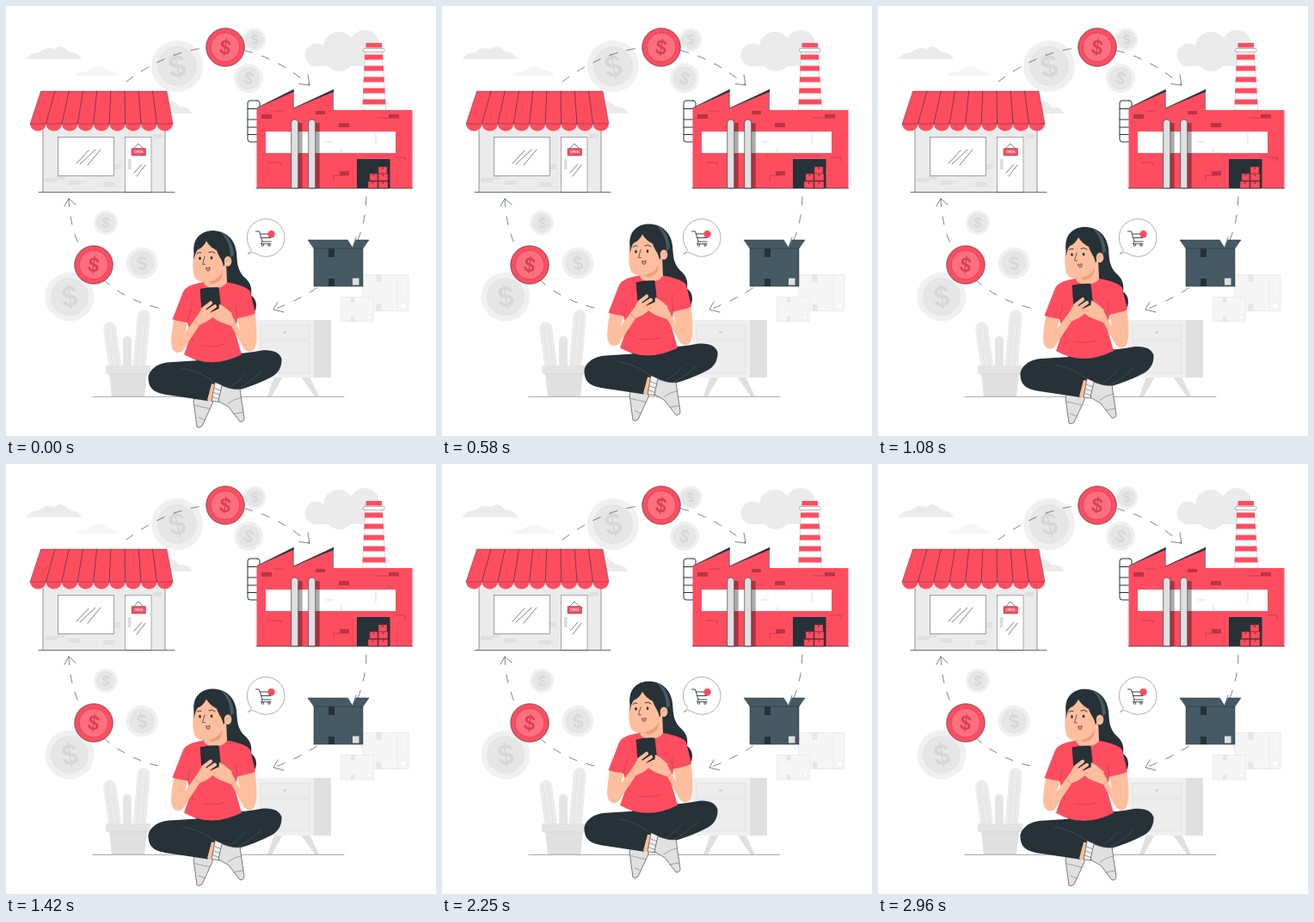
Animation of 500x500 px, one loop 3 s. Source, as an HTML page:

```html
<!DOCTYPE html>
<html lang="en">
<head>
<meta charset="utf-8">
<style>
html, body { margin: 0; width: 100%; height: 100%; overflow: hidden; background: #fff; }
svg { display: block; width: 100vw; height: 100vh; }
text { font-family: Inter, Roboto, sans-serif; font-weight: 600; text-anchor: middle; }
</style>
</head>
<body>
<svg id="stage" viewBox="0 0 500 500"></svg>
<script>
const PINK = '#ff4d60', DARK = '#263238', SLATE = '#455a64', SKIN = '#ffbe9d';
const BRICK = '#b83645', SHADE = '#0005', G1 = '#f5f5f5', G2 = '#ebebeb', G3 = '#e0e0e0';

const range = (n, f) => Array.from({ length: n }, (_, i) => f(i)).join('');
const path = (d, fill, stroke = 'none', w = .7, extra = '') =>
  `<path d="${d}" fill="${fill}" stroke="${stroke}" stroke-width="${w}" ${extra}/>`;
const line = (d, stroke = DARK, w = .7, extra = '') =>
  path(d, 'none', stroke, w, 'stroke-linecap="round" stroke-linejoin="round" ' + extra);
const rect = (x, y, w, h, fill, stroke = 'none', sw = .7, rx = 0) =>
  `<rect x="${x}" y="${y}" width="${w}" height="${h}" rx="${rx}" fill="${fill}" stroke="${stroke}" stroke-width="${sw}"/>`;
const oval = (x, y, rx, ry, fill, stroke = 'none', w = .7) =>
  `<ellipse cx="${x}" cy="${y}" rx="${rx}" ry="${ry}" fill="${fill}" stroke="${stroke}" stroke-width="${w}"/>`;
const disc = (x, y, r, ...style) => oval(x, y, r, r, ...style);

function coin(x, y, r, tilt, pink) {
  const [rim, edge, face, ring, sign] = pink
    ? [PINK, DARK, '#ff7080', '#c93a4a', '#d83f50']
    : ['#f0f0f0', 'none', '#e6e6e6', '#dedede', '#d6d6d6'];
  const size = r * (pink ? .98 : 1.1);
  return disc(x, y, r, rim, edge, .6) + disc(x, y, r * .75, face, ring, .6) +
    `<text transform="translate(${x} ${y}) rotate(${tilt})" y="${size * .36}" font-size="${size}" fill="${sign}">$</text>`;
}

function clouds() {
  return path('M24 62Q28 54 39 54Q45 47 57 50Q64 43 73 53Q84 54 88 62Z', G2) +
    path('M80 81Q84 76 92 77Q100 71 108 70Q116 70 119 75Q128 75 131 81Z', G1) +
    path('M180 125L184 110Q194 107 201 117Q214 117 216 125Z', G2) +
    disc(361, 57, 13.5, G2) + disc(387, 48, 18, G2) + disc(388, 59, 17, G2) +
    disc(417, 45, 17, G2) + rect(361, 52, 56, 18, G2);
}

function arrows() {
  const dash = 'stroke-dasharray="9.5 11.5"';
  return line('M140 88Q250 6 353 92', DARK, .6, dash) + line('M341 90.5L353 92L351 80', DARK, .6) +
    line('M73 224C75 285 110 335 177 351', DARK, .6, dash) + line('M68 233L73 224L81 231', DARK, .6) +
    line('M419 222C417 285 385 325 311 353', DARK, .6, dash) + line('M316 344L311 353L323 356', DARK, .6);
}

function shop() {
  const bricks = [[45, 200, 14, 5], [73, 203, 14, 5], [113, 205, 14, 5], [126, 184, 7, 6], [171, 149, 11, 5], [59, 198, 9, 4]];
  return rect(43, 137, 142, 79, G2) + bricks.map(b => rect(...b, G3)).join('') +
    line('M43 144V216M185 144V216', DARK, .5) +
    rect(60.5, 152.5, 65, 45, '#fff', '#666', .6) +
    line('M82 183L96 168M86 184L104 167M95 185L110 167', DARK, .6) +
    rect(138.5, 152.5, 30.5, 64, '#fff', '#777', .6) +
    rect(142, 178, 3.5, 12, '#dcdcdc') + line('M149 194L158 184M152 198L162 185', DARK, .6) +
    line('M148 166L154 160L160 166', DARK, .6) + rect(146, 165.5, 16.5, 8.5, PINK, DARK, .4, 1) +
    '<text x="154.2" y="171.2" font-size="3.8" fill="#fff">OPEN</text>' +
    range(9, i => path(`M${28 + 18.44 * i} 136h18.44v1a9.22 8.5 0 0 1-18.44 0z`, PINK)) +
    path('M40.5 99H187L194 137H28Z', PINK, DARK, .4) +
    range(8, i => line(`M${57 + 16.2 * i} 99L${46.4 + 18.44 * i} 137`, DARK, .6)) +
    line('M38 216.5H196', DARK, .7);
}

function factory() {
  const bricks = [[297, 126, 12, 5], [360, 122, 11, 4], [387, 136, 12, 5], [445, 126, 12, 4.5], [388, 192, 11, 5]];
  const crates = [[433, 187, 10, 8], [421, 204, 11, 8], [433, 204, 11, 8], [423, 195, 9, 8], [433, 195, 11, 8]];
  const pipe = x => rect(x + 8, 136, 5, 76, SHADE) +
    path(`M${x} 212V136q0-4 4-4t4 4V212Z`, G3, DARK, .6);
  return line('M292 110H284Q281 110 281 113V155Q281 158 284 158H292M281 119.5H295M281 132H295M281 141H295M281 149.5H295M295 118V112Q295 110 292 110', DARK, 1) +
    path('M418 47H437L441.5 121H414.5Z', '#fff', '#bbb', .5) +
    range(5, i => {
      const y = 56.5 + 13 * i, a = 417.6 - .042 * (y - 47), b = 437.4 + .06 * (y - 47);
      return path(`M${a} ${y}H${b}L${b + .4} ${y + 6}H${a - .4}Z`, PINK);
    }) +
    rect(418.5, 43, 18.5, 5.5, PINK) + rect(415.5, 49.5, 24.5, 4, '#fff', '#888', .6, 1) +
    path('M291.5 119L334 98V119L380 98V121H472.5V212H291.5Z', PINK) +
    path('M291.5 118.5L334.5 97V99.5ZM334 119L381 97V99.5Z', DARK, DARK, .4) + line('M334.3 98V119M380.5 98V121', DARK, .6) +
    bricks.map(b => rect(...b, BRICK)).join('') +
    line('M307 182H320V185M432 130H444M381 203V197H393M452 176H464V180M311 122H322', '#a03340', .6) +
    rect(302, 146, 151, 25, '#fff') + line('M372 158H380M390 171V165M430 149V160', '#ffb2bb', .7) +
    pipe(331.7) + pipe(351.7) +
    rect(408, 178, 38.5, 34, DARK) +
    crates.map(([x, y, w, h]) => rect(x, y, w, h, PINK, '#8c2a36', .6) + rect(x + w / 2 - 1, y, 2, 3, BRICK)).join('') +
    line('M291 212H473', DARK, .7);
}

function boxes() {
  const ghost = (x, y, w, h, s) => rect(x, y, w, h, G1, '#e6e6e6', .7) +
    rect(x + w * .3, y, s, s * 1.4, '#e6e6e6') + rect(x + w * .3, y + h - s * 1.3, s, s * 1.3, '#e6e6e6') +
    rect(x + w - s - 3, y + h - s - 3, s, s, '#fff', '#e6e6e6', .5);
  return ghost(414.5, 312.5, 53.5, 42, 6) + line('M455 313V354', '#e6e6e6', .6) +
    ghost(389.5, 338.5, 38, 28.5, 4.5) +
    rect(358, 280, 57, 46, SLATE, DARK, .5) +
    path('M351 272H422L415 282H358Z', SLATE, DARK, .5) +
    path('M397 271L403 280.5L407 271Z', '#fff') + line('M407 269L403.5 279', DARK, .6) +
    rect(375, 282, 7, 10, DARK) + rect(375, 317, 7, 9, DARK) + rect(403, 316.5, 7.5, 8, G3);
}

function room() {
  const cactus = (x, y, w, tilt, fill) => {
    const h = 422 - y;
    return `<g transform="rotate(${tilt} ${x} 420)">` + rect(x - w / 2, y, w, h, fill, 'none', 0, w / 2) +
      line(`M${x - w / 5} ${y + 7}V420M${x + w / 5} ${y + 7}V420`, '#dedede', .6) + '</g>';
  };
  return cactus(127, 367, 15, -8, G2) + cactus(155, 353, 15, 5, G2) + cactus(141, 384, 10, 0, '#e6e6e6') +
    path('M120 427H164L161 454H123Z', G3) + rect(116, 418, 52, 9.5, '#e3e3e3') + line('M119 428H165', '#d2d2d2', .7) +
    path('M312 431H322L309 454H304ZM343 431H353L364 454H359Z', G3) +
    rect(291, 365, 67, 67, '#f0f0f0') + rect(358, 365, 20, 67, G3) +
    rect(296, 371, 57, 17, '#ededed', '#dcdcdc') + rect(296, 390, 57, 37, '#ededed', '#dcdcdc') +
    oval(324, 379.5, 2, 1.3, '#cfcfcf') + line('M101 454.3H393', '#666', .6);
}

function bubble() {
  return path('M285.5 283.5A21.8 21.8 0 1 1 289.5 287.2Q285.5 285.5 281 288.5Q284.5 286 285.5 283.5Z', '#fff', '#777', .6) +
    line('M290.5 262H294.5L298 274H308M295.5 265H307M297 269.5H308L309.5 266', DARK, .9) +
    line('M298 274L296.5 276.5H308', DARK, .8) +
    disc(298.5, 278, 1.3, '#fff', DARK, .8) + disc(306, 278, 1.3, '#fff', DARK, .8) +
    disc(308.5, 265.3, 4.2, PINK) + line('M306.8 266L308.3 267.2L310.5 264', '#d83f50', .6);
}

function woman() {
  const fold = '#b83c4a', crease = '#d98a6c';
  const backHair =
    path('M219 286C216 271 227 261 240 261C256 261 266 271 268 286C269 299 269 306 276 314C285 322 286 327 285 336C293 342 292 352 288 357L255 345L232 326C228 318 220 300 219 286Z', DARK);

  const legs =
    path('M222 448L241 454L240 462L228 488Q225 491 222 489L218 459Z', G3, DARK, .6) +
    line('M220 464L237 468M224 478L231 481', '#777', .6) +
    path('M252 405Q279 404 299 400Q317 399 320.5 410Q321 424 309 431Q290 441 268 447L236 458L225 430Z', DARK) +
    path('M208 404L222 412L190 414C174 415 165 425 165.5 433C166 446 174 449 185 451.5L235 459Q241 450 243 438Q262 433 276 416L274 403Z', DARK) +
    line('M205 421Q228 425 243 438M268 446Q288 435 297 424M279 427Q272 436 262 442', SLATE, .6) +
    path('M239 439L245 440L241 460L234 458Z', SKIN) +
    path('M243 437L252 441L248 460L239 459Z', '#f0f0f0', DARK, .6) +
    line('M242 444L250 447M241 449L249 452M240 454L248 457', '#666', .6) +
    path('M251 441Q263 446 272 445L277 479Q277 483 272 483L259 466L247 459Z', G3, DARK, .6) +
    line('M258 462Q266 456 274 455M265 474L276 472', '#777', .6);

  const torso =
    path('M229 321C217 323 209 326 206 332L193.5 364Q201 368 211 368L215 382L207 405Q238 423 274 405L267 381L269 363Q281 363 290 357L284 332Q280 325 257 321Z', PINK) +
    line('M211 368L215 352M269 363L267 348M228 394Q240 397 254 393M215 382L218 390', fold, .6);

  const head =
    path('M236 310L256 298L257 321Q253 328 241 328Q231 327 230 321L236 319Z', SKIN) +
    path('M236 320Q248 318 252 308Q252 321 239 323Z', '#ee9d7e') +
    path('M220 282C216 296 217 309 219.5 315Q223 322 234 320.5Q248 317 253 303L258 287L246 271L230 272Z', SKIN) +
    path('M218.5 288C217 273 227 261.5 240 261.5C254 261.5 263 271 264 287Q263 292 257 293L253 303C252 295 247 291 245 284Q237 280 233 273Q229 281 223 283Q220 286 218.5 296Z', DARK) +
    oval(258, 296.5, 4.3, 5.8, SKIN) + line('M256 297Q257 293 260 295', crease, .7) +
    path('M249 262.5Q263 267 265 289L261 293Q261 273 249 262.5Z', SLATE) +
    oval(225.5, 293, 1.3, 1.9, DARK) + oval(239, 292.5, 1.3, 1.9, DARK) +
    line('M222 287.5Q224 285.5 227 286.5M236 286Q240 284 243 287', DARK, .9) +
    line('M231 291L228.5 300H231.5', DARK, .7) +
    path('M232.5 304Q235 305 237 303.5Q238 307.5 235 308Q232.5 307.5 232.5 304Z', '#ff8a94', DARK, .6);

  const finger = d => line(d, SKIN, 4.2);
  const arms =
    path('M195 365L211 368L208 380L226 355Q230 347 236 347L238 358Q232 367 225 371L205 401Q198 405 194 399C190 392 193 379 195 365Z', SKIN) +
    path('M290 358L269 363L272 377L263 360Q255 348 247 346L244 358L249 367L262 372L277 399Q284 405 289 398C293 390 291 374 290 358Z', SKIN) +
    path('M226 329Q236 326.5 247 327L250 353L228 356Z', DARK, '#111', .5) +
    path('M225 355L231 348Q234 360 242 360Q233 369 224 370Z', SKIN) +
    finger('M229 352L238 345') + finger('M231 357L243 349') + finger('M234 361L247 354') +
    path('M248 346L263 357L257 369L249 367Q242 364 239 360L247 358Z', SKIN) +
    line('M249 347Q257 350 262 357M225 371Q221 369 220 365M262 372Q266 370 267 367', crease, .7);

  return backHair + legs + torso + head + arms;
}

const greyCoins = [[199, 70, 30, -12], [289, 39, 13.5, -10], [282, 84, 17, 18], [116, 252, 14, 8], [158, 299, 18.5, -8], [74, 338, 28.5, -8]];

document.getElementById('stage').innerHTML =
  clouds() + greyCoins.map(c => coin(...c)).join('') + arrows() +
  coin(255, 48, 22.3, 8, true) + coin(102, 301, 22.3, 8, true) +
  shop() + factory() + boxes() + room() + bubble() + `<g id="woman">${woman()}</g>`;

const floater = document.getElementById('woman');
const start = performance.now();

// Steady rise and fall of 10 units, 1.5 s per cycle.
function draw(now) {
  const phase = ((Math.max(0, now - start) + 50) % 1500) / 750;
  const lift = 10 * (phase < 1 ? phase : 2 - phase);
  floater.setAttribute('transform', `translate(0 ${(1 - lift).toFixed(2)})`);
  requestAnimationFrame(draw);
}
draw(start);
</script>
</body>
</html>
```
